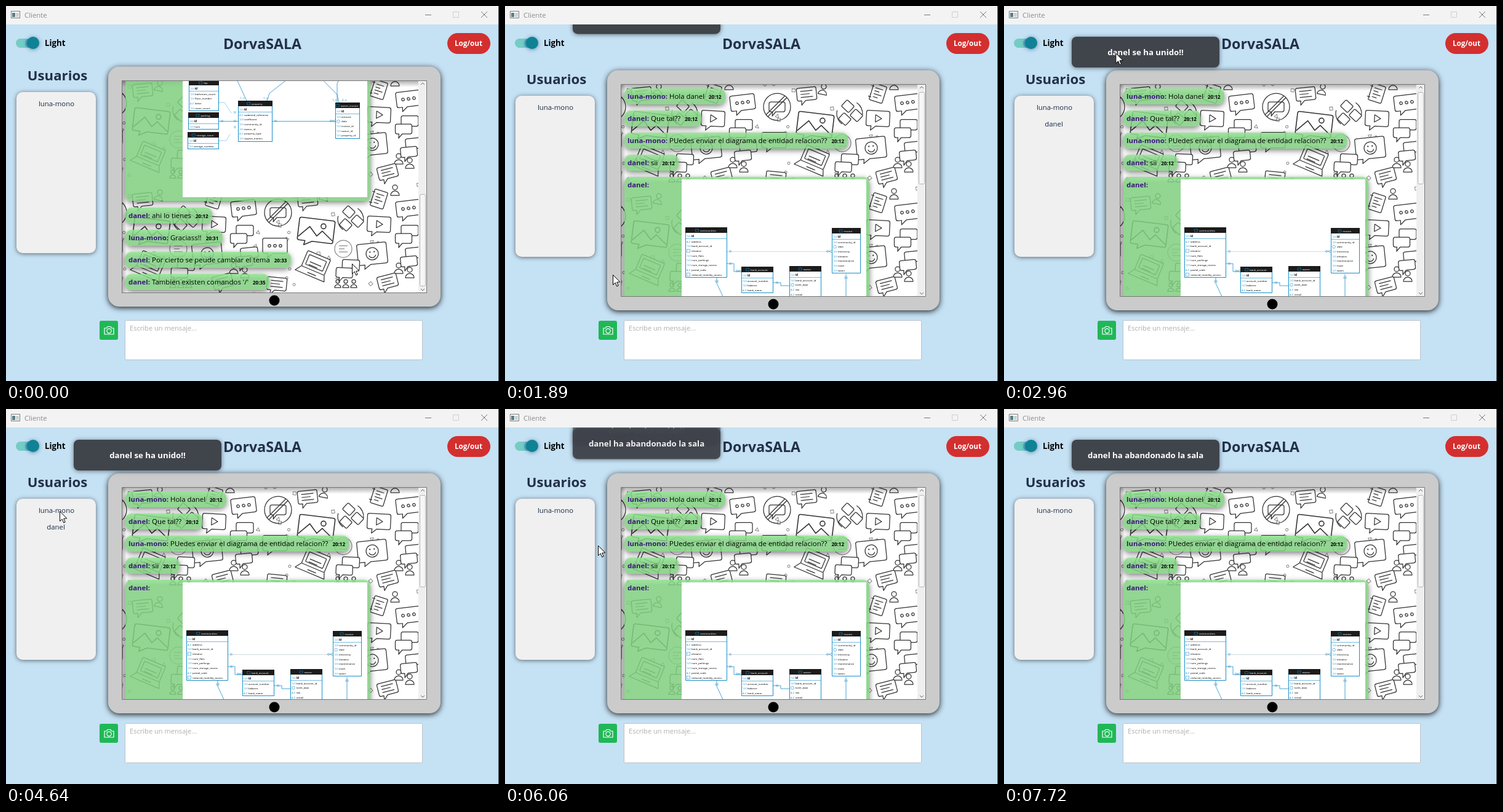
An HTML page with a canvas for the animation above (7990 ms loop, 801x610 px).

```html
<!DOCTYPE html>
<html lang="es">
<head>
<meta charset="utf-8">
<title>Cliente</title>
<style>
html, body { margin: 0; width: 100%; height: 100%; overflow: hidden; background: #c5e1f4; }
canvas { display: block; width: 801px; height: 610px; }
</style>
</head>
<body>
<canvas id="stage" width="801" height="610"></canvas>
<script>
const LOOP = 7990, W = 801, H = 610;
const FONT = '"Open Sans", "Noto Sans", sans-serif';
const PEER = 'danel', SELF = 'luna-mono';
const stage = document.getElementById('stage').getContext('2d');
let c = stage;

// ---- helpers ----
function text(s, x, y, size, color, weight = 400, align = 'left') {
  c.font = `${weight} ${size}px ${FONT}`;
  c.fillStyle = color;
  c.textAlign = align;
  c.textBaseline = 'alphabetic';
  c.fillText(s, x, y);
  return c.measureText(s).width;
}
function box(x, y, w, h, r, fill, stroke) {
  c.beginPath();
  c.roundRect(x, y, w, h, r);
  if (fill) { c.fillStyle = fill; c.fill(); }
  if (stroke) { c.strokeStyle = stroke; c.stroke(); }
}
function shadowed(color, blur, dy, draw) {
  c.save();
  c.shadowColor = color;
  c.shadowBlur = blur;
  c.shadowOffsetY = dy;
  draw();
  c.restore();
}
function line(...p) {
  c.beginPath();
  for (let i = 0; i < p.length; i += 2) c.lineTo(p[i], p[i + 1]);
  c.stroke();
}
function circle(x, y, r, fill) {
  c.beginPath();
  c.arc(x, y, r, 0, 7);
  if (fill) { c.fillStyle = fill; c.fill(); } else c.stroke();
}
const clamp = v => Math.max(0, Math.min(1, v));
const easeOut = p => 1 - (1 - clamp(p)) ** 3;

// ---- doodle wallpaper ----
const TW = 268, TH = 178;
function balloon(w, h) {
  const x = w / 2, y = h / 2;
  c.beginPath();
  c.moveTo(-x + 3, -y);
  c.lineTo(x - 3, -y);
  c.quadraticCurveTo(x, -y, x, -y + 3);
  c.lineTo(x, y - 3);
  c.quadraticCurveTo(x, y, x - 3, y);
  c.lineTo(-x + w * .42, y);
  c.lineTo(-x + w * .2, y + 7);
  c.lineTo(-x + w * .22, y);
  c.lineTo(-x + 3, y);
  c.quadraticCurveTo(-x, y, -x, y - 3);
  c.lineTo(-x, -y + 3);
  c.quadraticCurveTo(-x, -y, -x + 3, -y);
  c.fillStyle = '#fff';
  c.fill();
  c.stroke();
}
function rules(w, n) {
  for (let i = 0; i < n; i++) line(-w / 2, (i - (n - 1) / 2) * 5, w / 2 - (i % 2) * 5, (i - (n - 1) / 2) * 5);
}
const doodle = {
  dots() { balloon(40, 25); for (const x of [-9, 0, 9]) circle(x, 0, 2.2); },
  lines() { balloon(32, 21); rules(20, 3); },
  video() { balloon(38, 25); line(-4, -6, 6, 0, -4, 6, -4, -6); },
  smile() {
    balloon(48, 34);
    circle(0, 0, 10);
    circle(-3.5, -3, 1.2, '#333');
    circle(3.5, -3, 1.2, '#333');
    c.beginPath(); c.arc(0, 1, 5.5, .2, 2.9); c.stroke();
  },
  photo() {
    c.lineWidth = 1.6;
    balloon(58, 37);
    line(-28, 13, -11, -5, 2, 9, 10, 0, 28, 14);
    circle(11, -8, 4);
  },
  laptop() {
    box(-20, -18, 40, 27, 2, '#fff', '#333');
    box(-15, -13, 30, 17, 1, null, '#333');
    rules(20, 2);
    line(-20, 9, -27, 19, 24, 19, 20, 9);
    line(-7, 15, 8, 15);
  },
  pair() {
    c.translate(6, -7); balloon(28, 17);
    c.translate(-10, 13); balloon(27, 16);
  },
  banned() {
    c.save(); balloon(26, 16); c.restore();
    circle(0, 0, 22);
    line(-15, 16, 16, -15);
    line(-18, 13, 13, -18);
  },
  diamonds() {
    for (const [x, y] of [[-3, -12], [11, 3], [-8, 9]]) {
      c.save(); c.translate(x, y); c.rotate(.75);
      box(-8, -7, 16, 14, 2, '#fff', '#333');
      c.restore();
    }
    c.beginPath(); c.arc(0, 0, 21, -1, .1); c.stroke();
    c.beginPath(); c.arc(0, 0, 21, 2.2, 3.4); c.stroke();
  },
  person() { circle(0, -5, 4); c.beginPath(); c.arc(0, 8, 7, Math.PI, 0); c.closePath(); c.stroke(); },
  crowd() { for (const x of [-13, 0, 13]) { circle(x, -4, 3); c.beginPath(); c.arc(x, 6, 5, Math.PI, 0); c.closePath(); c.stroke(); } },
  note() { box(-11, -14, 22, 28, 2, '#fff', '#333'); rules(13, 4); line(-14, -9, -9, -9); line(-14, 9, -9, 9); },
  round() { c.strokeStyle = '#888'; circle(0, 0, 14, '#fff'); circle(0, 0, 14); rules(14, 3); }
};
const art = [
  ['dots', 198, 29, -.12], ['banned', 254, 36, 0], ['lines', 34, 15, -.1], ['person', 61, 8, .2],
  ['diamonds', 104, 47, 0], ['video', 150, 55, .05], ['pair', 194, 72, 0], ['photo', 48, 65, .12],
  ['laptop', 46, 122, .4], ['smile', 139, 103, -.1], ['dots', 249, 90, 0], ['round', 92, 95, 0],
  ['pair', 98, 128, .05], ['crowd', 96, 152, 0], ['person', 182, 127, 0], ['person', 200, 134, 0],
  ['lines', 164, 148, -.25], ['note', 150, 14, .3], ['person', 176, 0, 0], ['lines', 252, 152, .1],
  ['pair', 202, 109, -.1]
];
function makeTile() {
  const cv = document.createElement('canvas');
  cv.width = TW; cv.height = TH;
  c = cv.getContext('2d');
  c.fillStyle = '#fff';
  c.fillRect(0, 0, TW, TH);
  const wrap = (x, y, rot, draw) => {
    for (let i = -1; i < 2; i++) for (let j = -1; j < 2; j++) {
      c.save();
      c.translate(x + i * TW, y + j * TH);
      c.rotate(rot);
      draw();
      c.restore();
    }
  };
  let seed = 11;
  const rnd = () => (seed = seed * 16807 % 2147483647) / 2147483647;
  c.strokeStyle = '#888';
  for (let i = 0; i < 26; i++) {
    const x = rnd() * TW, y = rnd() * TH, kind = i % 3;
    wrap(x, y, rnd() * 2, () => {
      if (kind == 0) c.strokeRect(-2.5, -2.5, 5, 5);
      else if (kind == 1) circle(0, 0, 2);
      else line(-3, 2, 0, -3, 3, 2, -3, 2);
    });
  }
  c.lineJoin = 'round';
  c.strokeStyle = '#333';
  c.lineWidth = 1.25;
  for (const [kind, x, y, rot] of art) wrap(x, y, rot, doodle[kind]);
  c = stage;
  return c.createPattern(cv, 'repeat');
}
const wallpaper = makeTile();

// ---- diagram: name, x, y, width, columns after id ----
const BLUE = '#1b8fc9';
const tables = [
  ['communities', 293, 232, 68, 'address bank_account_id elevator num_flats num_parkings num_storage_rooms postal_code reduced_mobility_access'],
  ['bank_account', 384, 296, 52, 'account_number balance bank_name'],
  ['owner', 462, 295, 52, 'bank_account_id birth_date dni email name phone'],
  ['invoice', 531, 233, 47, 'community_id date electricity elevator maintenance trash water'],
  ['flat', 297, 390, 49, 'bathroom_count floor_number letter room_count'],
  ['parking', 296, 443, 50, 'num'],
  ['storage_room', 295, 475, 51, 'storage_number'],
  ['property', 377, 424, 56, 'cadastral_reference coefficient community_id owner_id property_type square_meters'],
  ['owner_invoice', 535, 427, 40, 'amount date invoice_id owner_id property_id']
];
const textual = /address|postal|dni|email|^name|bank_name|phone|cadastral|letter|type/;
const boxed = /elevator|reduced/;
function table([name, x, y, w, cols]) {
  const rows = cols.split(' ');
  const h = 28 + 7.7 * (rows.length - 1);
  c.lineWidth = 1;
  c.fillStyle = '#fff';
  c.fillRect(x, y, w, h);
  c.strokeStyle = BLUE;
  c.strokeRect(x + .5, y + .5, w - 1, Math.round(h) - 1);
  c.fillStyle = '#1c1c1c';
  c.fillRect(x, y, w, 9);
  text(name, x + w / 2 + 3, y + 6.5, 4.3, '#fff', 400, 'center');
  const half = c.measureText(name).width / 2;
  c.lineWidth = .6;
  c.strokeRect(x + w / 2 - half - 4.5, y + 3, 5, 4);
  line(x, y + 18.5, x + w, y + 18.5);
  ['id', ...rows].forEach((col, i) => {
    const ty = y + (i ? 24.6 + 7.7 * (i - 1) : 15.6);
    if (boxed.test(col) && name == 'communities') c.strokeRect(x + 2.5, ty - 4.2, 5, 5);
    else if (/date/.test(col)) circle(x + 5, ty - 1.6, 2.4);
    else text(textual.test(col) ? 'A-Z' : '123', x + 2, ty, 4, BLUE);
    text(col, x + 10, ty, 4.3, '#000', i ? 400 : 700);
  });
}
function diagram() {
  c.fillStyle = '#fff';
  c.fillRect(287, 154, 300, 427);
  c.lineWidth = .8;
  c.setLineDash([1, 1]);
  c.strokeStyle = '#8fa3ad';
  line(361, 271.5, 531, 271.5);
  c.strokeStyle = BLUE;
  line(346, 427, 355, 427, 366, 444);
  line(346, 489, 358, 489, 364, 478);
  c.setLineDash([]);
  line(361, 291, 372, 291, 372, 304, 384, 304);
  line(436, 322, 448, 322, 448, 327, 462, 327);
  line(554, 308, 554, 360, 538, 396, 538, 427);
  line(344, 314, 344, 323, 391, 424);
  line(488, 365, 428, 412, 424, 424);
  line(490, 365, 538, 414, 541, 427);
  line(346, 457.5, 377, 457.5);
  line(433, 457.5, 535, 457.5);
  c.lineWidth = .6;
  for (const [x, y] of [[365, 291], [365, 271], [441, 322], [371, 443], [371, 457], [371, 467], [437, 457], [350, 457]]) {
    line(x, y - 2, x, y + 2);
    line(x + 2, y - 2, x + 2, y + 2);
  }
  for (const [x, y] of [[344, 319], [554, 313]]) { line(x - 3, y, x + 3, y); line(x - 3, y + 2, x + 3, y + 2); }
  for (const [x, y] of [[526, 271], [379, 303], [530, 457]]) { circle(x - 2, y, 1.5); line(x, y, x + 5, y - 2); line(x, y, x + 5, y + 2); }
  text('1..n', 380, 422, 4.5, BLUE);
  text('1..n', 418, 422, 4.5, BLUE);
  text('1..n', 530, 425, 4.5, BLUE);
  text('0..n', 546, 425, 4.5, BLUE);
  tables.forEach(table);
}

// ---- chat ----
const messages = [
  [19, SELF, `Hola ${PEER}`, '20:12'],
  [55, PEER, 'Que tal??', '20:12'],
  [91, SELF, 'PUedes enviar el diagrama de entidad relacion??', '20:12'],
  [127, PEER, 'sii', '20:12'],
  [611, PEER, 'ahi lo tienes', '20:12'],
  [647, SELF, 'Graciass!!', '20:31'],
  [683, PEER, 'Por cierto se peude cambiar el tema', '20:33'],
  [719, PEER, "Tambien existen comandos '/'", '20:35']
];
function bubble(x, y, w, h) {
  c.save();
  c.beginPath();
  c.rect(0, y - 40, W, h + 80);
  c.roundRect(x, y, w, h, 10);
  c.clip('evenodd');
  shadowed('rgba(0,0,0,.5)', 10, 3, () => box(x, y, w, h, 10, '#8fd58f'));
  c.restore();
  const g = c.createLinearGradient(0, y, 0, y + 8);
  g.addColorStop(0, 'rgba(144,228,144,.88)');
  g.addColorStop(1, 'rgba(128,207,128,.86)');
  box(x, y, w, h, 10, g);
}
function message([y, who, body, time]) {
  const size = 11.4;
  c.font = `700 ${size}px ${FONT}`;
  const nameW = c.measureText(who + ':').width + 3;
  c.font = `400 ${size}px ${FONT}`;
  const bodyW = c.measureText(body).width + 7;
  bubble(194, y - 13, nameW + bodyW + 32, 26);
  text(who + ':', 199, y + 4, size, '#39177a', 700);
  text(body, 199 + nameW, y + 4, size, '#000');
  text(time, 199 + nameW + bodyW, y + 4, 8, '#000', 700);
}
const scrollSteps = [[0, 392], [130, 340], [200, 250], [270, 165], [340, 95], [540, 40], [870, 2], [1000, 0]];
const scrollAt = t => scrollSteps.filter(s => s[0] <= t).pop()[1];

function chat(t) {
  shadowed('rgba(0,0,0,.85)', 10, 2, () => box(166, 98.5, 540, 390.5, 18, '#cbcbcb'));
  circle(436, 479, 8.5, '#000');
  const scroll = scrollAt(t);
  c.save();
  c.beginPath();
  c.rect(188, 122, 496, 345);
  c.clip();
  c.save();
  c.translate(188, 122);
  c.fillStyle = wallpaper;
  c.fillRect(0, 0, 496, 345);
  c.restore();
  for (const [x, y] of [[0, 10], [8, 0]]) {
    const g = c.createLinearGradient(188, 122, 188 + x, 122 + y);
    g.addColorStop(0, 'rgba(0,0,0,.3)');
    g.addColorStop(1, 'rgba(0,0,0,0)');
    c.fillStyle = g;
    c.fillRect(188, 122, 482, 345);
  }
  c.save();
  c.translate(0, 122 - scroll);
  bubble(194, 150, 398, 437);
  text(PEER + ':', 199, 167, 11.4, '#39177a', 700);
  diagram();
  messages.forEach(message);
  c.restore();
  c.fillStyle = '#efefef';
  c.fillRect(670, 122, 14, 345);
  c.lineWidth = 1;
  box(672.5, 134.5 + scroll / 392 * 172, 9, 149, 2, '#f6f6f6', '#b4b4b4');
  c.strokeStyle = '#666';
  line(674, 128, 677, 125, 680, 128);
  line(674, 460, 677, 463, 680, 460);
  c.restore();
  c.lineWidth = 1;
  c.strokeStyle = '#777';
  c.strokeRect(188.5, 121.5, 495, 345);
}

// ---- window parts ----
function users(t) {
  text('Usuarios', 83.5, 121, 22.2, '#233048', 700, 'center');
  shadowed('rgba(0,0,0,.55)', 7, 1, () => box(17, 140, 129, 262, 10, '#f0f0f0'));
  text(SELF, 82, 163, 11.4, '#1a2a44', 400, 'center');
  if (t >= 2100 && t < 5785) text(PEER, 81, 190, 11.4, '#1a2a44', 400, 'center');
}
function header() {
  c.fillStyle = '#f3f3f3';
  c.fillRect(0, 0, W, 30);
  c.lineWidth = 1;
  c.strokeStyle = '#777';
  c.fillStyle = '#fff';
  c.fillRect(8, 8, 15, 12);
  c.strokeRect(8.5, 8.5, 14, 11);
  c.fillStyle = '#5c7f86';
  c.fillRect(10, 11, 5, 7);
  c.fillStyle = '#c8d4d8';
  c.fillRect(16, 11, 5, 7);
  text('Cliente', 30, 19, 11.4, '#8c8c8c');
  c.strokeStyle = '#777';
  line(681, 14.5, 691, 14.5);
  line(772, 9, 782, 19);
  line(782, 9, 772, 19);
  c.strokeStyle = '#cfcfcf';
  c.strokeRect(726.5, 9.5, 9, 9);
}
function controls() {
  box(16, 53, 34, 15, 7.5, '#74ccc5');
  box(31, 53, 16, 15, 7, '#5aa6c6');
  shadowed('rgba(0,60,90,.5)', 6, 1, () => circle(44, 60, 10, '#0f8296'));
  text('Light', 63, 65, 13.3, '#000', 700);
  text('DorvaSALA', 416.5, 70, 23.2, '#233048', 700, 'center');
  box(717, 44, 70, 34, 17, '#d32f2f');
  text('Log/out', 751.5, 65, 11.6, '#fff', 700, 'center');
}
function composer() {
  box(152, 512, 30, 31, 3, '#20b857');
  c.lineWidth = 1.2;
  c.strokeStyle = '#fff';
  c.lineJoin = 'round';
  line(160, 524, 163.5, 524, 165, 521.5, 170, 521.5, 171.5, 524, 175, 524, 175, 534, 160, 534, 160, 523.5);
  circle(167.5, 528.5, 3.6);
  c.lineWidth = 1;
  box(193.5, 511.5, 483, 64, 2, '#fff', '#bcc3c8');
  text('Escribe un mensaje...', 201, 528, 11.1, '#b0b0b0');
}
function toast(s, dy, alpha) {
  c.save();
  c.beginPath();
  c.rect(0, 30, W, 100);
  c.clip();
  c.globalAlpha = alpha;
  shadowed('rgba(0,0,0,.5)', 7, 1, () => box(110, 50 + dy, 240, 50, 8, '#40444b'));
  text(s, 230, 80 + dy, 13.2, '#fff', 700, 'center');
  c.restore();
}
function toasts(t) {
  const enter = start => -73.5 * (1 - easeOut((t - start) / 750));
  if (t >= 1820 && t < 6400) {
    const leave = t < 5390 ? 0 : -10 - (t - 5390) * 30 / 670;
    toast(PEER + ' se ha unido!!', enter(1820) + leave, 1 - clamp((t - 5390) / 1010) ** 2);
  }
  if (t >= 5785) toast(PEER + ' ha abandonado la sala', enter(5785), .88 + .12 * clamp((t - 5785) / 700));
}

// ---- pointer: each path is a list of [time, x, y] ----
const paths = [
  [[0, 562, 419], [540, 562, 419], [870, 618, 414], [1260, 618, 414], [1890, 175, 437], [2100, 175, 434],
    [2570, 178, 78], [2770, 176, 76], [2960, 181, 76], [3510, 370, 399], [3650, 224, 489], [3700, 224, 489]],
  [[4640, 87, 166], [5250, 117, 201]],
  [[5785, 110, 190], [6060, 151, 222], [6200, 151, 208], [6970, 211, 90], [7250, 296, 93], [7440, 297, 80], [7715, 711, 386]]
];
function pointer(t) {
  const path = paths.find(p => t >= p[0][0] && t < p[p.length - 1][0]);
  if (!path) return;
  const i = path.findIndex(k => k[0] > t);
  const [t0, x0, y0] = path[i - 1], [t1, x1, y1] = path[i];
  const p = (t - t0) / (t1 - t0);
  c.save();
  c.translate(x0 + (x1 - x0) * p + .5, y0 + (y1 - y0) * p + .5);
  c.strokeStyle = '#000';
  c.fillStyle = '#fff';
  c.lineWidth = 1;
  c.beginPath();
  for (const [x, y] of [[0, 0], [0, 16], [3.7, 12.6], [6.2, 18.5], [8.7, 17.4], [6.2, 11.8], [11.3, 11.4]]) c.lineTo(x, y);
  c.closePath();
  c.fill();
  c.stroke();
  c.restore();
}

function frame(now) {
  const t = now % LOOP;
  c.fillStyle = '#c5e1f4';
  c.fillRect(0, 0, W, H);
  header();
  controls();
  c.save();
  c.translate(0, t >= 1820 ? 6 : 0);
  users(t);
  chat(t);
  c.restore();
  composer();
  toasts(t);
  pointer(t);
  c.fillStyle = '#2a2e33';
  c.fillRect(800, 0, 1, H);
  requestAnimationFrame(frame);
}
requestAnimationFrame(frame);
</script>
</body>
</html>
```
